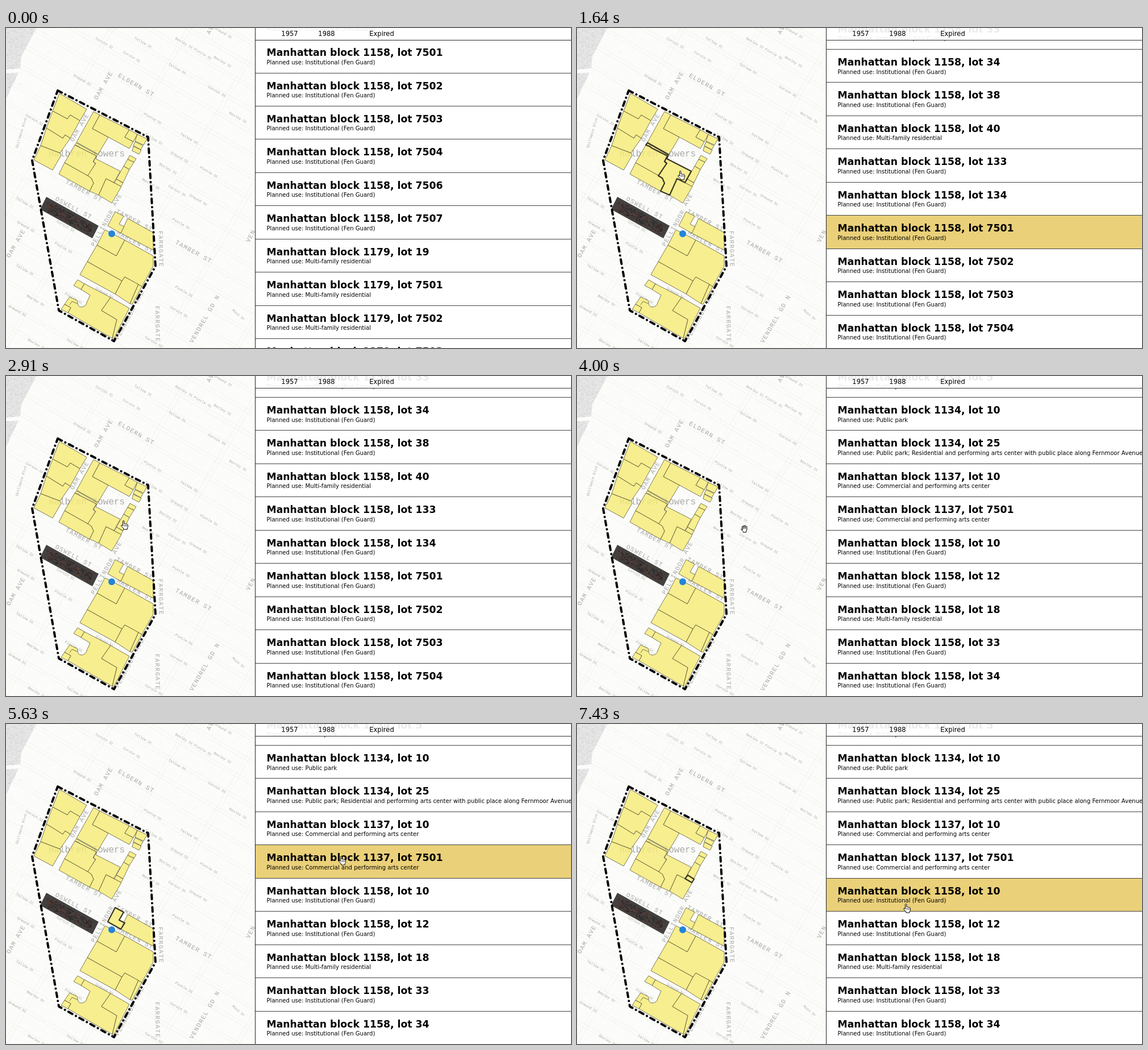
An HTML page with a canvas for the animation above (7.66 s loop, 994x563 px).

```html
<!DOCTYPE html>
<html lang="en">
<head>
<meta charset="utf-8">
<title>Lot map and list</title>
<style>
  html, body { margin: 0; width: 994px; height: 563px; overflow: hidden; background: #fff; }
  #stage { position: relative; width: 994px; height: 563px; overflow: hidden; color: #000; font-family: "DejaVu Sans", sans-serif; }
  #paper, #map, #cursor { position: absolute; left: 0; top: 0; }
  #panel { position: absolute; left: 438px; top: 0; width: 556px; height: 563px; overflow: hidden; background: #fff; border-left: 1px solid #222; box-sizing: border-box; }
  #list { position: absolute; left: 0; top: 0; width: 100%; }
  .row { position: relative; height: 58.44px; box-sizing: border-box; border-bottom: 1px solid #444; white-space: nowrap; }
  .row.on { background: #ead079; }
  .row b, .row span { position: absolute; left: 19.5px; line-height: 20px; }
  .row b { top: 12px; font-size: 17.28px; }
  .row span { top: 29.5px; font-size: 10.08px; }
  #head { position: absolute; left: 0; top: 0; width: 100%; height: 21px; background: rgba(255,255,255,.92); border-bottom: 1px solid #333; font-size: 11.52px; line-height: 20px; }
  #head span { position: absolute; top: 0; transform: translateX(-50%); }
  #labels text { font-family: "Liberation Mono", monospace; fill: #a9a9a7; text-anchor: middle; dominant-baseline: central; }
  #lots { fill: #f7ec78; fill-opacity: .82; stroke: #45422a; stroke-width: .7; stroke-linejoin: round; }
  #outline { fill: none; stroke: #3a3726; stroke-width: 2.2; stroke-linejoin: round; }
  #edge { fill: none; stroke: #000; stroke-width: 4; stroke-linecap: round; stroke-linejoin: round; stroke-dasharray: 8 7 .1 7; }
  #cursor { overflow: visible; fill: #fff; stroke: #000; stroke-width: 1; stroke-linejoin: round; stroke-linecap: round; }
</style>
</head>
<body>
<div id="stage">
  <canvas id="paper" width="439" height="563"></canvas>
  <svg id="map" width="439" height="563">
    <g id="labels"></g>
    <g id="lots">
      <polygon points="94,115 142,143 130,163 113,153 108,160 82,146"/>
      <polygon points="82,146 108,160 113,153 130,163 113,194 104,188 100,194 71,176"/>
      <polygon points="71,176 100,194 104,188 113,194 95,220 61,207"/>
      <polygon points="61,207 95,220 97,224 82,250 49,232"/>
      <polygon points="154,147 165,153 152,177 180,192 162,222 124,201"/>
      <polygon points="165,153 217,179 209,192 224,200 217,212 180,192 152,177"/>
      <polygon points="217,179 231,187 224,200 209,192"/>
      <polygon points="231,187 248,195 242,206 227,199"/>
      <polygon points="227,200 241,207 237,214 224,207"/>
      <polygon points="224,208 238,215 234,222 222,216"/>
      <polygon points="218,224 229,230 225,236 214,231"/>
      <polygon points="214,231 225,236 217,249 207,243"/>
      <polygon id="lot6" points="207,243 217,249 206,272 194,266"/>
      <polygon id="lot5" points="195,266 206,273 202,279 190,272"/>
      <polygon id="lot13" points="176,265 203,279 186,308 163,294"/>
      <polygon id="lot14" points="121,206 124,202 161,223 158,230 201,252 190,272 176,265 163,294 147,287 154,273 150,264 143,260 158,238 154,235 159,225 131,211 128,208"/>
      <polygon id="lot16" points="121,206 131,211 159,225 153,235 157,239 144,260 103,237"/>
      <polygon id="lot17" points="103,237 144,260 150,264 154,273 147,287 93,257"/>
      <polygon id="lot4" points="192,323 207,331 199,345 209,350 202,361 179,348"/>
      <polygon id="lot3" points="214,335 259,360 259,391 202,361"/>
      <polygon points="174,355 209,373 194,401 160,382"/>
      <polygon points="209,373 259,401 259,419 239,455 209,438 204,445 143,411 160,382 194,401"/>
      <polygon points="143,411 204,445 192,468 130,434"/>
      <polygon points="209,438 233,451 218,485 192,468 204,445"/>
      <polygon points="233,451 239,455 222,486 218,485"/>
      <polygon points="126,443 138,450 132,460 119,453"/>
      <path d="M138 450 184 474 168 497 195 513 187 546 109 501 114 492 103 486 112 473 126 480 Q125 491 133 491 Q141 490 142 483L148 470 132 460Z"/>
      <polygon points="184,474 217,493 190,546 187,546 195,513 168,497"/>
      <polygon points="103,486 114,492 109,501 97,495"/>
      <path d="M112 487 116 481 126 485" fill="none"/>
    </g>
    <polygon id="outline"/>
    <polygon id="edge" points="91,110 250,192 263,419 190,551 93,497 46,233"/>
    <circle cx="186" cy="362" r="6" fill="#2384d8"/>
  </svg>
  <div id="panel">
    <div id="list"></div>
    <div id="head"><span style="left:60px">1957</span><span style="left:125px">1988</span><span style="left:222px">Expired</span></div>
  </div>
  <svg id="cursor" width="16" height="18">
    <path id="point" d="M3.5 9V1.8Q3.5 .5 4.7 .5T5.8 1.8V6Q8 5 8.3 6.5 10.2 5.6 10.6 7 12.5 6.5 12.5 8.6V11.5L11.2 14V16H4.8V14.2L1 10.2Q0 8.5 1.5 8.2ZM6 8.5V10M8.3 8.5V10M10.5 9V10"/>
    <path id="grab" d="M3.5 8.5 2.2 4Q2 2.6 3 2.5T4.4 4L4.6 2Q4.8 .8 5.8 1T6.7 2.5Q7 .7 8.2 1.1T9 3.2Q9.6 2 10.6 2.6T11 4.6L10.8 9 9.5 11V13H4.5V11.8L.8 8.4Q.2 7 1.5 7ZM4.4 4 5 6.5M6.7 2.5V6M9 3.2 8.7 6.3"/>
  </svg>
</div>
<script>
const $ = id => document.getElementById(id);
const LOOP = 7660, PITCH = 58.44, CENTER = 271.8;

// list
const aid = 'Institutional (Fen Guard)', homes = 'Multi-family residential', arts = 'Commercial and performing arts center';
const groups = [
  [1134, 'Public park', [5, 10]],
  [1134, 'Public park; Residential and performing arts center with public place along Fernmoor Avenue', [25]],
  [1137, arts, [10, 7501]],
  [1158, aid, [10, 12]], [1158, homes, [18]],
  [1158, aid, [33, 34, 38]], [1158, homes, [40]],
  [1158, aid, [133, 134, 7501, 7502, 7503, 7504, 7506, 7507]],
  [1179, homes, [19, 7501, 7502, 7503, 7504, 7505]]
];
const rows = groups.flatMap(([block, use, lots]) => lots.map(lot => {
  const row = document.createElement('div');
  row.className = 'row';
  row.innerHTML = `<b>Manhattan block ${block}, lot ${lot}</b><span>Planned use: ${use}</span>`;
  $('list').append(row);
  return row;
}));

// map labels
function label(text, x, y, angle, size, gap = 0) {
  const el = document.createElementNS('http://www.w3.org/2000/svg', 'text');
  el.textContent = text;
  el.setAttribute('transform', `translate(${x} ${y}) rotate(${angle})`);
  el.style.fontSize = size + 'px';
  el.style.letterSpacing = gap + 'px';
  $('labels').append(el);
}
const street = (text, x, y, angle) => label(text, x, y, angle, 11, 1.4);
label('Halbren Towers', 142, 222, 0, 16);
street('ELDERN ST', 229, 101, 30);
street('TAMBER ST', 137, 287, 28);
street('OSWELL ST', 119, 317, 28);
street('TAMBER ST', 226, 339, 28);
street('MARLEN ST', 227, 377, 28);
street('TAMBER ST', 330, 394, 29);
street('OAM AVE', 172, 101, -60);
street('OAM AVE', 130, 175, -60);
street('OAM AVE', 18, 379, -60);
street('PELLINDOR', 170, 352, -61);
street('AVE', 196, 302, -61);
street('AVE', 362, 0, -60);
street('FERNMOOR AVE', 218, 505, -62);
street('FARRGATE', 272, 389, 89);
street('FARRGATE', 266, 521, 89);
street('VENDREL GD N', 350, 512, -60);
street('VEN', 431, 366, -62);
label('Quillmere Blvd', 27, 185, -73, 6.5);
label('Moss Dr', 409, 505, 40, 6.5);

const lanes = ['Corvin St', 'Tallow St', 'Bexley St', 'Ormund St', 'Pintle St'];
const spots = '173,27 241,26 313,27 382,9 346,46 221,51 301,72 381,60 134,92 258,160 371,112 322,195 408,158 305,228 357,254 301,287 260,196 255,275 338,303 308,345 50,162 33,308 285,248 35,350 101,387 105,349 33,426 52,480 20,498 313,464 304,500 122,557 54,557 173,467 119,476 260,553';
spots.split(' ').forEach((p, i) => label(lanes[i % 5], ...p.split(',').map(Number), 30, 6.5));

// paper texture
let seed = 7;
const rand = () => (seed = seed * 16807 % 2147483647) / 2147483647;
const g = $('paper').getContext('2d');
function shape(points, fill) {
  g.beginPath();
  points.forEach(([x, y]) => g.lineTo(x, y));
  g.closePath();
  g.fillStyle = fill;
  g.fill();
}
function specks(n, w, h, color) {
  g.fillStyle = color;
  for (let i = 0; i < n; i++) g.fillRect(rand() * w, rand() * h, 1 + rand(), 1);
}
g.fillStyle = '#fcfcfa';
g.fillRect(0, 0, 439, 563);
specks(6000, 439, 563, 'rgba(90,90,80,.045)');
specks(90, 439, 563, 'rgba(90,90,80,.12)');
g.save();
g.rotate(Math.PI / 6);
g.strokeStyle = 'rgba(100,100,90,.06)';
for (let y = -230; y < 500; y += 34) {
  g.strokeRect(-10, y, 760, 6);
}
for (let x = 40; x < 700; x += 118) g.strokeRect(x, -250, 7, 800);
g.restore();
g.save();
shape([[0, 0], [53, 0], [27, 50], [25, 72], [0, 125]], '#e7e7e7');
g.clip();
specks(1300, 55, 125, 'rgba(110,110,110,.12)');
g.restore();
shape([[0, 73], [26, 71], [26, 78], [0, 80]], '#fcfcfa');

// cleared block
g.save();
shape([[71, 297], [163, 348], [152, 370], [60, 319]], '#424140');
g.clip();
g.translate(71, 297);
g.rotate(.506);
for (let i = 0; i < 420; i++) {
  g.fillStyle = i % 3 ? 'rgba(30,27,26,.7)' : 'rgba(112,52,36,.75)';
  g.fillRect(6 + rand() * 92, 4 + rand() * 17, 1 + rand() * 2, 1);
}
g.restore();

// time, x, y of the pointer
const path = [
  [1120, 330, 285], [1300, 290, 274], [1560, 205, 258], [1640, 177, 251], [1880, 160, 247],
  [1920, 156, 248], [2160, 121, 260], [2330, 121, 260], [2490, 145, 254], [2910, 202, 254],
  [2970, 197, 263], [3050, 202, 253], [3340, 202, 253], [3670, 286, 262], [3990, 286, 262],
  [4000, 287, 262], [4300, 450, 258], [4500, 560, 290], [4750, 580, 371], [4790, 580, 373],
  [5150, 584, 300], [5550, 585, 236], [5630, 585, 232], [5850, 585, 185], [6250, 580, 377],
  [6520, 580, 377], [6850, 584, 185], [7240, 574, 313], [7330, 574, 313], [7430, 574, 316]
];
// time, row hovered on the map
const hovers = [[0, -1], [1560, 13], [1640, 14], [1960, 16], [2040, 17], [2400, 16], [2600, 14], [2780, 13], [2900, -1], [2950, 5], [3020, 6], [3400, -1]];
// time, row brought to the middle
const scrolls = [[0, 18.29], [1600, 13], [1680, 14], [2000, 16], [2080, 17], [2440, 16], [2640, 14], [2820, 13], [2990, 5]];

const held = (keys, t) => keys.filter(k => k[0] <= t).pop()[1];
function place(t) {
  const i = path.findIndex(k => k[0] > t);
  if (i < 0) return path[path.length - 1].slice(1);
  const [t0, x0, y0] = path[i - 1], [t1, x1, y1] = path[i];
  const f = (t - t0) / (t1 - t0);
  return [x0 + (x1 - x0) * f, y0 + (y1 - y0) * f];
}

let active = -1;
function focusRow(row) {
  if (row === active) return;
  rows[active]?.classList.remove('on');
  rows[row]?.classList.add('on');
  $('outline').setAttribute('points', $('lot' + row)?.getAttribute('points') || '');
  active = row;
}

function draw(t) {
  const top = CENTER - PITCH * held(scrolls, t);
  $('list').style.top = top + 'px';
  let row = held(hovers, t);
  const shown = t >= 1120;
  $('cursor').style.display = shown ? '' : 'none';
  if (shown) {
    const [x, y] = place(t);
    const inList = x > 435;
    if (inList) row = Math.floor((y - top) / PITCH);
    const pointing = inList || x < 215;
    $('point').style.display = pointing ? '' : 'none';
    $('grab').style.display = pointing ? 'none' : '';
    $('cursor').style.transform = `translate(${Math.round(x)}px,${Math.round(y)}px)`;
  }
  focusRow(row);
}

const start = performance.now();
function tick(now) {
  draw(Math.max(0, now - start) % LOOP);
  requestAnimationFrame(tick);
}
draw(0);
requestAnimationFrame(tick);
</script>
</body>
</html>
```
